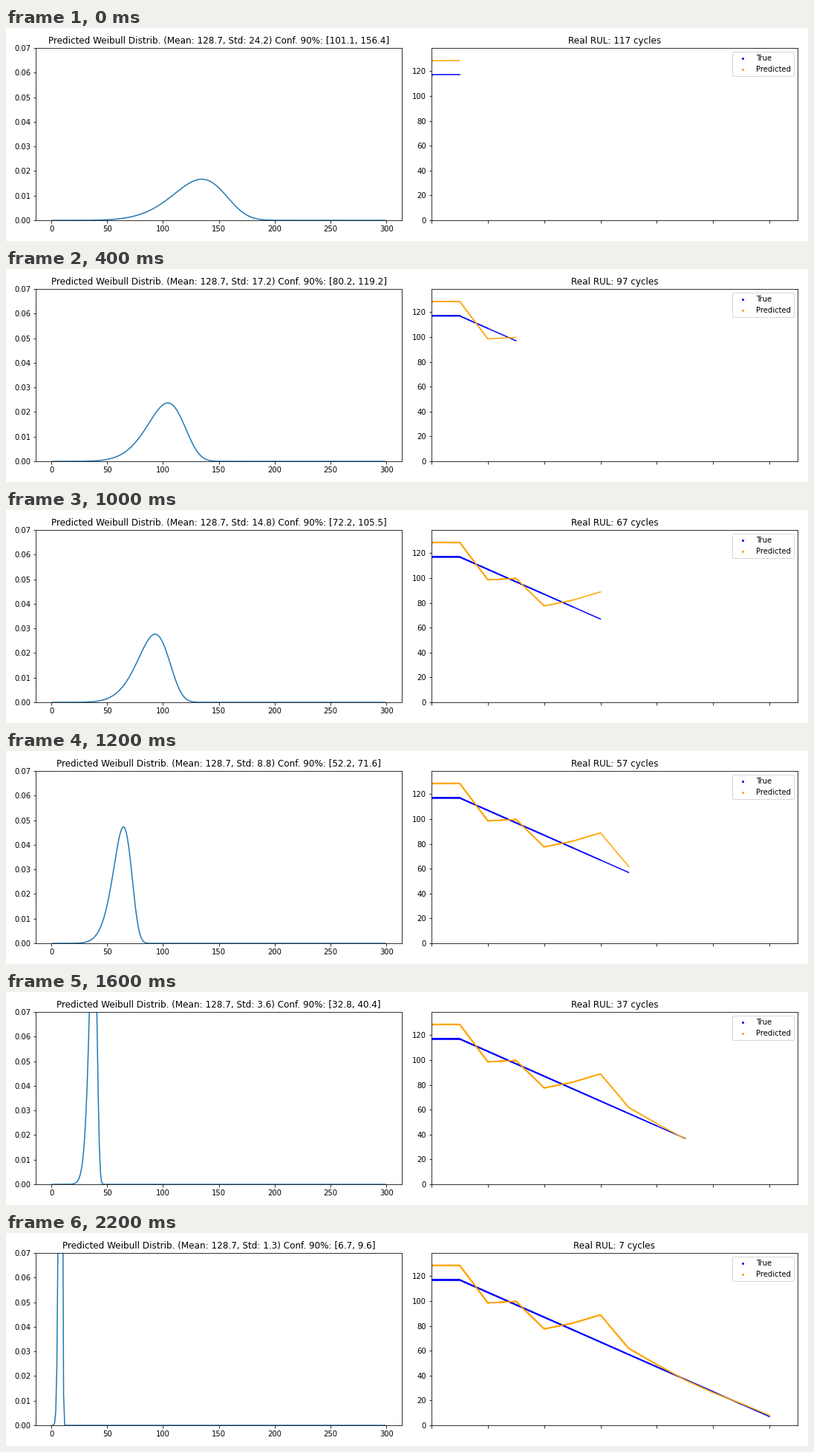
These frames come from a looping animation (1080x288 px, 2400 ms). A matplotlib script:

```python
import math

import matplotlib.pyplot as plt
import numpy as np
from matplotlib.animation import FuncAnimation

W, H, DPI = 1080, 288, 72
STEPS = 12

# Per step: standard deviation and confidence bounds of the prediction
STD = [24.2, 16.9, 17.2, 12.3, 13.2, 14.8, 8.8, 6.1, 3.6, 2.6, 1.9, 1.3]
LOW = [101.1, 79.4, 80.2, 63.8, 67.2, 72.2, 52.2, 42.2, 32.8, 23.6, 15.5, 6.7]
HIGH = [156.4, 117.7, 119.2, 91.3, 97.0, 105.5, 71.6, 55.6, 40.4, 29.1, 19.5, 9.6]

mean = (np.array(LOW) + np.array(HIGH)) / 2
rul = 117 - 10 * np.arange(STEPS)

# Both histories start with their first value repeated
true_path = np.insert(rul, 0, rul[0])
pred_path = np.insert(mean, 0, mean[0])


def weibull_params(mu, sigma):
    """Scale and shape of the Weibull law with this mean and deviation."""
    lo, hi = 1.0, 60.0
    for _ in range(50):
        shape = (lo + hi) / 2
        g1, g2 = math.gamma(1 + 1 / shape), math.gamma(1 + 2 / shape)
        if math.sqrt(g2 / g1**2 - 1) > sigma / mu:
            lo = shape
        else:
            hi = shape
    return mu / g1, shape


def weibull_pdf(x, scale, shape):
    z = x / scale
    return shape / scale * z ** (shape - 1) * np.exp(-(z**shape))


def add_axes(left):
    return fig.add_axes([left / W, 28 / H, 493 / W, 233 / H])


plt.rcParams["font.family"] = "DejaVu Sans"
fig = plt.figure(figsize=(W / DPI, H / DPI), dpi=DPI, facecolor="white")

ax_pdf = add_axes(40.1)
ax_pdf.set(xlim=(-13.9, 313.9), ylim=(0, 0.07))
ax_pdf.set_xticks(range(0, 301, 50))
ax_pdf.set_yticks(np.arange(8) / 100)
ages = np.arange(1, 300)
curve, = ax_pdf.plot(ages, np.zeros(len(ages)), color="C0", lw=1.5)
pdf_title = ax_pdf.set_title("", fontsize=12)

ax_rul = add_axes(573)
ax_rul.set(xlim=(0, 13), ylim=(0, 138.7))
ax_rul.set_xticks(range(0, 13, 2), labels=[])
ax_rul.set_yticks(range(0, 121, 20))
rul_title = ax_rul.set_title("", fontsize=12)

series = [(true_path, "blue", "True"), (pred_path, "orange", "Predicted")]
for path, color, label in series:
    ax_rul.plot(0, path[0], "o", color=color, ms=2, label=label)
ax_rul.legend(loc="upper right")

# Each step lays the whole history so far over the earlier lines
layers = []
for n in range(2, STEPS + 2):
    layers.append([ax_rul.plot(range(n), path[:n], color=color, lw=1.5)[0]
                   for path, color, _ in series])


def update(step):
    curve.set_ydata(weibull_pdf(ages, *weibull_params(mean[step], STD[step])))
    pdf_title.set_text(
        f"Predicted Weibull Distrib. (Mean: 128.7, Std: {STD[step]:.1f}) "
        f"Conf. 90%: [{LOW[step]:.1f}, {HIGH[step]:.1f}]")
    rul_title.set_text(f"Real RUL: {rul[step]} cycles")
    for i, lines in enumerate(layers):
        for line in lines:
            line.set_visible(i <= step)
    return []


anim = FuncAnimation(fig, update, frames=STEPS, interval=200,
                     repeat=True, repeat_delay=0, blit=False)
plt.show()
```
